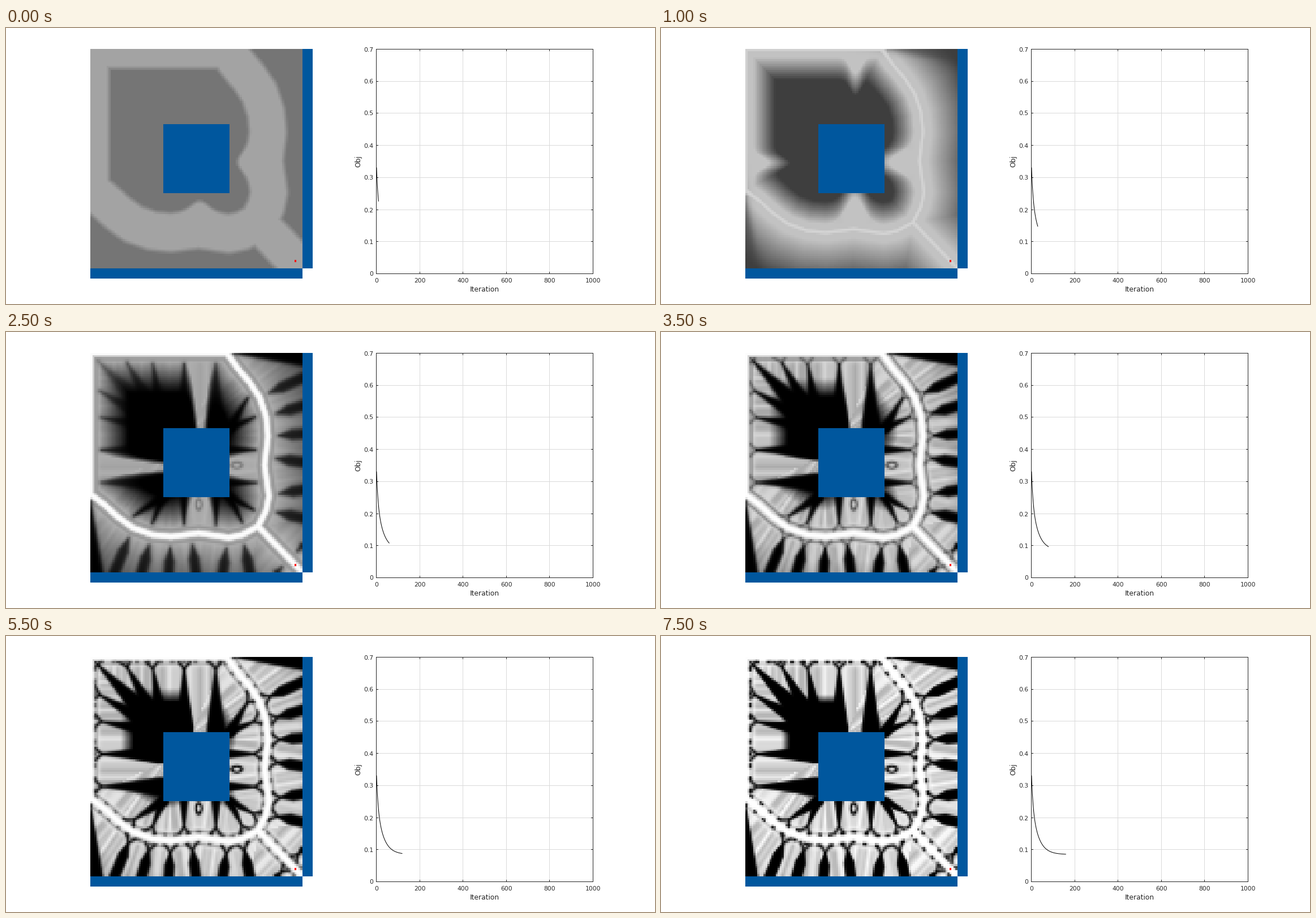
Write a matplotlib script that moves like this. It is 1147 by 488 pixels and loops after 8000 ms.

```python
import numpy as np
import matplotlib.pyplot as plt
from matplotlib.animation import FuncAnimation
from matplotlib.patches import Rectangle
from matplotlib.path import Path

W, H, DPI = 1147, 488, 100
N, FRAMES, STEP_MS = 105, 16, 500
HOLE = (36, 69)
BLUE, INK, GRID = "#00579e", "#262626", "#dadada"
PX = 72 / DPI

# The layout mirrors about its diagonal, so only the upper half is described.
cols, rows = np.meshgrid(np.arange(N) + 0.5, np.arange(N) + 0.5)
X, Y = np.maximum(cols, rows), np.minimum(cols, rows)

SPINE = np.array([(0, 0), (67.5, 0), (72.5, 6.8), (78.6, 13.8), (83.7, 21.1),
                  (87, 30.6), (87.9, 40), (86.2, 53.7), (88.4, 68.6),
                  (87, 75.3), (83, 83), (105, 105)])
ARCS = np.append(0, np.cumsum(np.hypot(*np.diff(SPINE, axis=0).T)))

ROOTS = [0, 15.5, 30, 46.5, 62, 89, 102, 120, 136, 152]  # arc positions
PILLAR, LENS = 54.5, 128


def segment(a, b):
    """Length covered along a segment and distance from it."""
    (x0, y0), (x1, y1) = a, b
    length = np.hypot(x1 - x0, y1 - y0)
    dx, dy = (x1 - x0) / length, (y1 - y0) / length
    t = np.clip((X - x0) * dx + (Y - y0) * dy, 0, length)
    return t, np.hypot(X - x0 - t * dx, Y - y0 - t * dy)


def spine_at(s):
    return np.array([np.interp(s, ARCS, SPINE[:, i]) for i in (0, 1)])


def toward(a, b, length):
    return a + (b - a) * length / np.hypot(*(b - a))


def hole_point(s):
    return np.clip(spine_at(s), *HOLE)


def nearest_arc(point):
    s = np.linspace(0, ARCS[-1], 800)
    return s[np.argmin(np.hypot(*(spine_at(s) - point[:, None])))]


def bell(v):
    return np.exp(-v * v)


def mask(v, soft):
    return 1 / (1 + np.exp(-np.clip(2 * v / soft, -40, 40)))


def ramp(k, start, span):
    return float(np.clip((k - start) / span, 0, 1))


def key(k, *values):
    return np.interp(k, [0, 1, 3, 5, 7, 15], values)


legs = [segment(a, b) for a, b in zip(SPINE, SPINE[1:])]
gaps = np.array([d for _, d in legs])
spots = np.array([s + t for s, (t, _) in zip(ARCS, legs)])
DEPTH = gaps.min(axis=0)
ALONG = np.take_along_axis(spots, gaps.argmin(axis=0)[None], 0)[0]
INNER = Path(SPINE[:-1]).contains_points(
    np.column_stack([X.ravel(), Y.ravel()])).reshape(X.shape)
LANES = [segment(spine_at(s), hole_point(s))[1] for s in (PILLAR, LENS)]
noise = np.random.default_rng(4).random(120)
STREAKS = np.interp(ALONG, np.arange(120) * 1.7, noise) * mask(DEPTH - 4.5, 1)


def make_finger(s, base, widen, cap):
    """A dark wedge from base to the spine, forked near its tip."""
    tip = toward(spine_at(s), base, 5.5)
    t, d = segment(tip, base)
    wedge = np.minimum(0.5 + widen * t, cap) - d
    fork = np.full(X.shape, -50.0)
    for side in (-3, 3):
        end = toward(spine_at(s + side), base, 2.6)
        fork = np.maximum(fork, 0.75 - segment(tip, end)[1])
    birth = 1 + 0.07 * np.hypot(*(base - tip))
    return wedge, fork, birth


fingers = [make_finger(s, hole_point(s), 0.14, 4.5) for s in ROOTS]
for row in 12 + 13.4 * np.arange(7):
    edge = np.array([105, row])
    fingers.append(make_finger(nearest_arc(edge), edge, 0.35, 2.7)[:2] + (3,))


def density(k):
    soft = key(k, 2, 2, 2, 1.1, 0.8, 0.45)

    # Light fades with depth, except along two lanes that reach the hole.
    reach = key(k, 0, 3, 12, 30, 36, 40), key(k, 4, 8, 14, 18, 20, 20)
    depth = DEPTH - INNER * sum(
        r * bell(d / w) for r, d, w in zip(reach, LANES, (3.8, 6)))
    near = key(k, 8, 5, 3, 4, 12, 18)
    far = np.where(INNER, key(k, 10.5, 12.5, 17, 19, 21, 22),
                   key(k, 10.5, 17, 35, 45, 60, 90))
    f = key(k, 1, 1, 0.72, 0.7, 0.87, 1) * np.clip((far - depth) / (far - near), 0, 1)
    f *= 1 - key(k, 0, 0, 0, 0.1, 0.25, 0.3) * STREAKS
    f *= 1 - ramp(k, 0, 3) * mask(0.18 * (X - 69) - Y, soft)

    for wedge, fork, birth in fingers:
        f *= 1 - ramp(k, birth, 2.5) * mask(wedge, soft)
        f *= 1 - 0.9 * ramp(k, 5, 5) * mask(fork, 0.6)

    eye = np.hypot((X - 72.5) / 3, (Y - 53.7) / 1.8)
    f *= 1 - 0.9 * ramp(k, 3, 7) * bell((eye - 0.8) / 0.35)

    # Spine with its shaded edge, which breaks up into beads
    f *= 1 - key(k, 0, 0, 0, 0.15, 0.35, 0.2) * bell((DEPTH - 3) / 0.9)
    f = np.maximum(f, mask(2.1 - DEPTH, 0.5 + 0.3 * soft))
    beads = np.clip(1.3 * np.cos(2 * np.pi * ALONG / 5.8), 0, 1)
    f *= 1 - 0.85 * ramp(k, 7, 8) * beads * bell((DEPTH - 2.5) / 0.8)

    # Each step may only move so far from the even starting grey.
    low, high = max(0, 0.459 - 0.107 * k), min(1, 0.64 + 0.102 * k)
    return low + (high - low) * f


fig = plt.figure(figsize=(W / DPI, H / DPI), dpi=DPI, facecolor="white")
ax = fig.add_axes([0, 0, 1, 1])
fields = [density(k) for k in range(FRAMES)]
image = ax.imshow(fields[0], cmap="gray", vmin=0, vmax=1, interpolation="nearest",
                  extent=(149, 524, 425, 37), aspect="auto")
ax.set_xlim(0, W)
ax.set_ylim(H, 0)
ax.axis("off")


def block(c0, r0, c1, r1, color):
    """Fill a range of grid cells."""
    x0, x1 = (round(149 + c * 375 / N) for c in (c0, c1))
    y0, y1 = (round(37 + r * 388 / N) for r in (r0, r1))
    ax.add_patch(Rectangle((x0, y0), x1 - x0, y1 - y0, fc=color, lw=0, zorder=3))


block(HOLE[0], HOLE[0], HOLE[1], HOLE[1], BLUE)
block(N, 0, N + 5, N, BLUE)
block(0, N, N, N + 5, BLUE)
block(101, 101, 102, 102, "#ff0000")

# Chart
L, R, T, B = 654.5, 1037.5, 37.5, 434.5


def line(xs, ys, color, z):
    ax.plot(xs, ys, color=color, lw=PX, zorder=z, snap=False,
            solid_capstyle="projecting", solid_joinstyle="miter")


def label(x, y, text, size, **kw):
    ax.text(x, y, text, fontsize=size * PX, family="DejaVu Sans", color=INK, **kw)


for i in range(6):
    x = round(L - 0.5 + (R - L) * i / 5) + 0.5
    if 0 < i < 5:
        line([x, x], [T, B], GRID, 1)
    line([x, x], [B, B - 3], INK, 2)
    line([x, x], [T, T + 3], INK, 2)
    label(x, 445.5, str(200 * i), 10.7, ha="center", va="center_baseline")
for i in range(8):
    y = round(B - 0.5 - (B - T) * i / 7) + 0.5
    if 0 < i < 7:
        line([L, R], [y, y], GRID, 1)
    line([L, L + 3], [y, y], INK, 2)
    line([R, R - 3], [y, y], INK, 2)
    label(649, y, f"{i / 10:g}", 10.7, ha="right", va="center_baseline")
line([L, R, R, L, L], [T, T, B, B, T], INK, 2)
label(845.5, 461.5, "Iteration", 12.2, ha="center", va="center_baseline")
label(622.5, 235.5, "Obj", 12.2, ha="center", va="center", rotation=90)

curve, = ax.plot([], [], color="black", lw=PX, snap=False, zorder=4,
                 solid_capstyle="butt")


def update(k):
    image.set_data(fields[k])
    n = np.arange(1, 10 * (k + 1) + 1)
    obj = 0.085 + 0.166 * np.exp(-n / 30) + 0.1 * np.exp(-n / 6.5)
    curve.set_data(L + (R - L) * n / 1000, B - (B - T) * obj / 0.7)
    return image, curve


anim = FuncAnimation(fig, update, frames=FRAMES, interval=STEP_MS,
                     init_func=lambda: update(0), repeat=True, repeat_delay=0)
plt.show()
```
